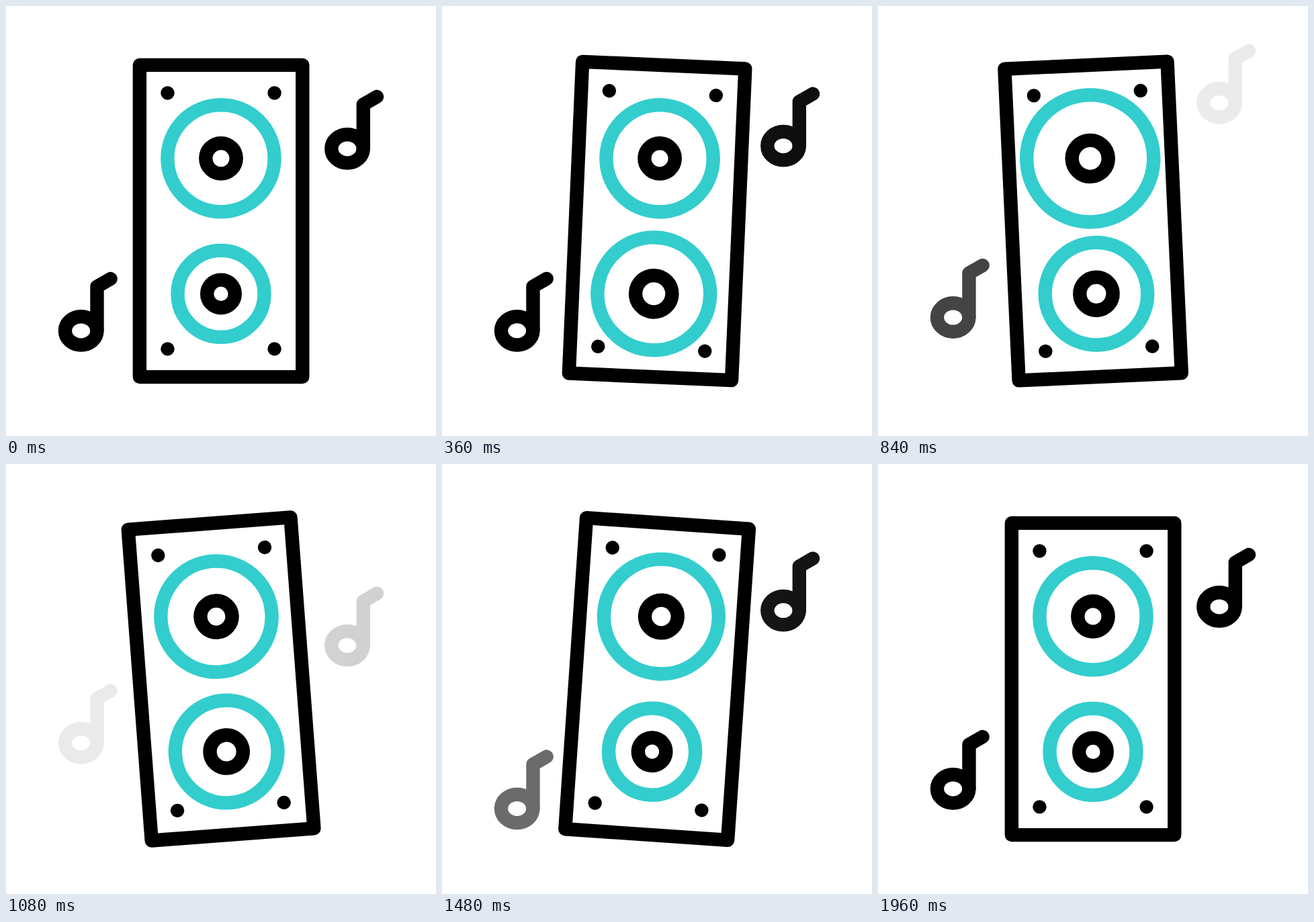
These frames come from a looping animation (640 px wide and 640 px high, 2000 ms). An HTML page:

```html
<!DOCTYPE html>
<html lang="en">
<head>
<meta charset="utf-8">
<title>Dancing speaker</title>
<style>
  html, body { margin: 0; width: 100%; height: 100%; overflow: hidden; background: #fff; }
  svg { display: block; width: 100%; height: 100%; }
  .line { fill: none; stroke: #000; stroke-width: 20.4; stroke-linecap: round; stroke-linejoin: round; }
  .teal { stroke: #33cdcd; }
</style>
</head>
<body>
<svg viewBox="0 0 640 640">
  <defs>
    <g id="note" class="line">
      <ellipse cx="508" cy="212.4" rx="23.7" ry="21.2"/>
      <path d="M531.8 212.4V146.6L552 135"/>
    </g>
  </defs>
  <g id="speaker">
    <rect class="line" x="198.9" y="87.9" width="242.4" height="464.2"/>
    <g class="line">
      <circle id="topRing" class="teal" cx="320" cy="226.8"/>
      <circle id="topHub" cx="320" cy="226.8"/>
      <circle id="lowRing" class="teal" cx="320" cy="428.4"/>
      <circle id="lowHub" cx="320" cy="428.4"/>
    </g>
    <circle cx="240.5" cy="129.5" r="10.2"/>
    <circle cx="399.6" cy="129.5" r="10.2"/>
    <circle cx="240.5" cy="510.4" r="10.2"/>
    <circle cx="399.6" cy="510.4" r="10.2"/>
  </g>
  <g id="rightNote"><use href="#note"/></g>
  <g id="leftNote"><use href="#note"/></g>
</svg>
<script>
  const LOOP = 2000, STEP = 40;
  const el = id => document.getElementById(id);

  // Cubic Bezier easing, solved by bisection.
  function bezier(x1, y1, x2, y2) {
    const at = (a, b, u) => 3 * a * u * (1 - u) ** 2 + 3 * b * u * u * (1 - u) + u ** 3;
    return p => {
      let lo = 0, hi = 1;
      for (let i = 0; i < 24; i++) {
        const mid = (lo + hi) / 2;
        if (at(x1, x2, mid) < p) lo = mid; else hi = mid;
      }
      return at(y1, y2, lo);
    };
  }

  const smooth = p => p * p * (3 - 2 * p);
  const snap = bezier(0.7, 0, 0.64, 1);
  const leave = bezier(0.866, 0, 0.833, 0.833);
  const arrive = bezier(0.167, 0.167, 0.39, 1);

  // Keys are [time, value, easing towards this key].
  function track(keys, t) {
    if (t <= keys[0][0]) return keys[0][1];
    for (let i = 1; i < keys.length; i++) {
      const [from, a] = keys[i - 1], [to, b, ease = smooth] = keys[i];
      if (t < to) return a + (b - a) * ease((t - from) / (to - from));
    }
    return keys[keys.length - 1][1];
  }

  const sway = [[160, 0], [560, 5], [970, -5], [1360, 5, snap], [1760, 0]];
  const topBeat = [[656, 0], [900, 1], [1144, 0], [1380, 0], [1640, 1], [1900, 0]];
  const lowBeat = [[80, 0], [360, 1], [640, 0], [680, 0], [960, 1], [1240, 0]];

  function floatNote(note, x, y, t) {
    let shift = 0, opacity = 1;
    if (t < 880) {
      const p = track([[80, 0], [880, 1, leave]], t);
      shift = -74 * p;
      opacity = 1 - p;
    } else {
      const p = track([[1001, 0], [1695, 1, arrive]], t);
      shift = 70 * (1 - p);
      opacity = p;
    }
    note.setAttribute('transform', `translate(${x} ${y + shift})`);
    note.setAttribute('opacity', opacity);
  }

  function draw(t) {
    el('speaker').setAttribute('transform', `rotate(${track(sway, t)} 320 320)`);
    const top = track(topBeat, t), low = track(lowBeat, t);
    el('topRing').setAttribute('r', 79.6 + 17.6 * top);
    el('topHub').setAttribute('r', 22.7 + 5.1 * top);
    el('lowRing').setAttribute('r', 64.5 + 19.4 * low);
    el('lowHub').setAttribute('r', 20.8 + 6.4 * low);
    floatNote(el('rightNote'), 0, 0, t);
    floatNote(el('leftNote'), -396.3, 271, t - 240);
  }

  const start = performance.now();
  function tick() {
    const t = (performance.now() - start) % LOOP;
    draw(Math.floor(t / STEP) * STEP);
    requestAnimationFrame(tick);
  }
  tick();
</script>
</body>
</html>
```
